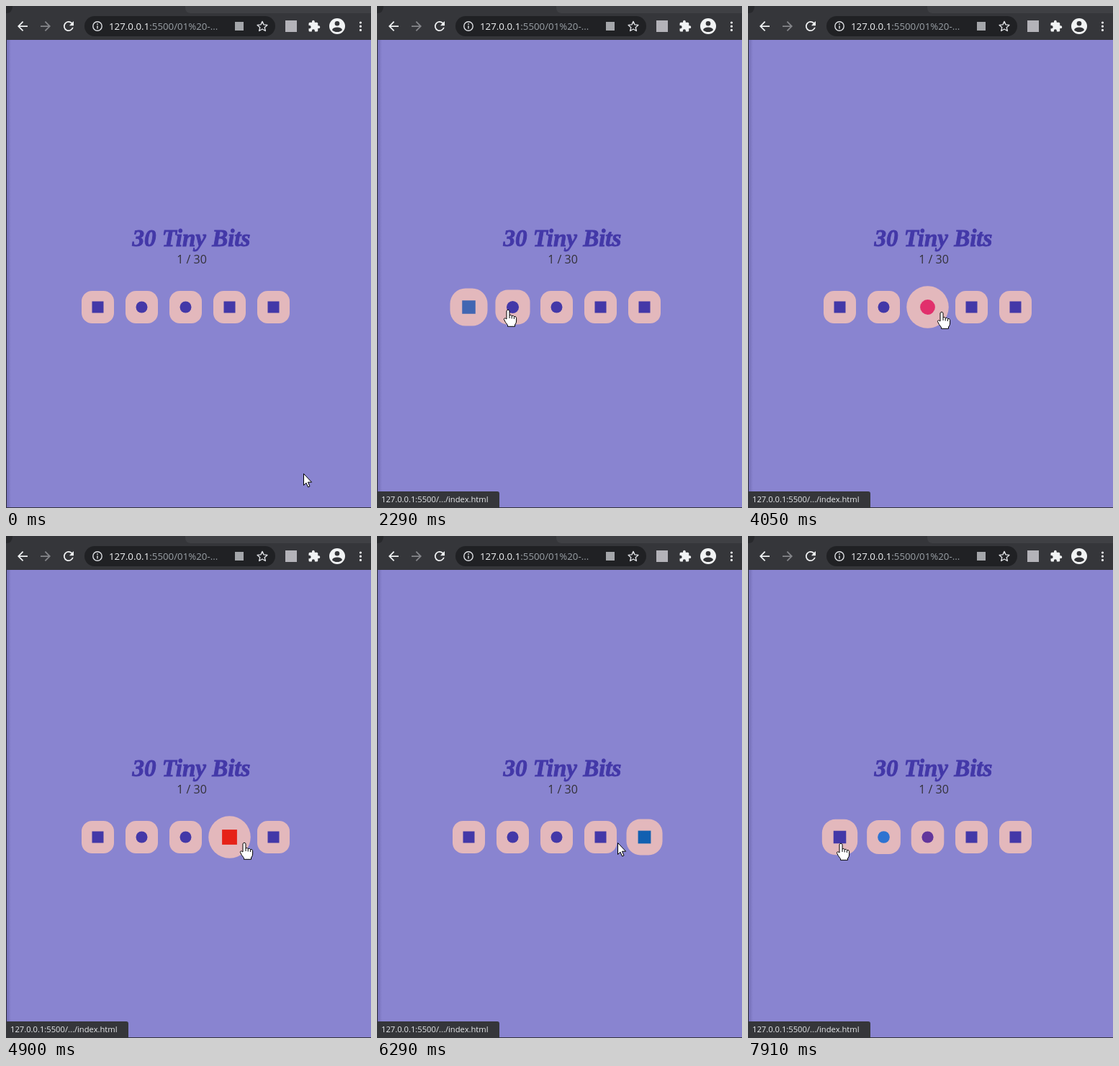
An HTML page that plays this animation: 507x696 px, repeating every 7990 ms.

```html
<!DOCTYPE html>
<html lang="en">
<head>
<meta charset="utf-8">
<title>Icon hover</title>
<style>
html, body { margin: 0; width: 100%; height: 100%; overflow: hidden; background: #8984d0; }
svg { display: block; }
text { font-family: "Open Sans", sans-serif; }
.title { font: italic bold 33px "Liberation Serif", serif; fill: #4338a8; stroke: #4338a8; stroke-width: .9; }
</style>
</head>
<body>
<svg width="507" height="696" viewBox="0 0 507 696">
  <defs>
    <linearGradient id="edge">
      <stop offset="0" stop-color="#736eb6"/>
      <stop offset="1" stop-color="#8984d0"/>
    </linearGradient>
    <path id="back" d="M20 11H7.8l5.6-5.6L12 4l-8 8 8 8 1.4-1.4L7.8 13H20z"/>
  </defs>
  <rect width="507" height="696" fill="#8984d0"/>
  <rect x="1" y="47" width="6" height="649" fill="url(#edge)"/>
  <rect y="47" width="1" height="649" fill="#2c2b36"/>
  <rect y="695" width="507" height="1" fill="#35343f"/>

  <!-- browser bar -->
  <rect width="507" height="47" fill="#35363a"/>
  <path d="M249 0H507V10H257Q249 10 249 2Z" fill="#3f4044"/>
  <path d="M0 0H9Q9 10 0 10Z" fill="#28292c"/>
  <rect x="109" y="14" width="265" height="28" rx="14" fill="#202124"/>
  <g fill="#f1f3f4">
    <use href="#back" transform="translate(12.5 17.5) scale(.875)"/>
    <use href="#back" transform="translate(65.5 17.5) scale(-.875 .875)" fill="#85868a"/>
    <path transform="translate(76.5 17.5) scale(.875)" d="M17.6 6.4A8 8 0 1 0 19.7 14h-2.1A6 6 0 1 1 16.2 7.8L13 11h7V4z"/>
    <path transform="translate(419 19) scale(.75)" d="M20.5 11H19V7q0-2-2-2H13V3.5a2.5 2.5 0 0 0-5 0V5H4Q2 5 2 7v3.8h1.5a2.7 2.7 0 0 1 0 5.4H2V20q0 2 2 2h3.8v-1.5a2.7 2.7 0 0 1 5.4 0V22H17q2 0 2-2v-4h1.5a2.5 2.5 0 0 0 0-5z"/>
    <circle cx="460" cy="28" r="11"/>
    <path d="M492.5 23v.01m0 5.2v.01m0 5.2v.01" stroke="#f1f3f4" stroke-width="3.2" stroke-linecap="round"/>
  </g>
  <g fill="#35363a">
    <circle cx="460" cy="24.2" r="3.3"/>
    <path d="M453 33.2Q454 29.6 460 29.6T467 33.2Q464.5 36 460 36T453 33.2Z"/>
  </g>
  <g fill="none" stroke="#dfe1e5" stroke-width="1.4">
    <circle cx="127" cy="28" r="6.2"/>
    <path d="M127 24.3v1.6M127 27.2v4.3"/>
    <path stroke-linejoin="round" d="M356 21.4l2 4.5 4.9.5-3.7 3.3 1.1 4.8-4.3-2.5-4.3 2.5 1.1-4.8-3.7-3.3 4.9-.5z"/>
  </g>
  <rect x="318" y="22" width="12" height="12" fill="#a4a6aa"/>
  <rect x="388" y="20" width="16" height="16" fill="#b4b3b9"/>
  <text x="143" y="33" font-size="13.3" fill="#9aa0a6"><tspan fill="#f1f3f4">127.0.0.1</tspan>:5500/01%20-...</text>

  <text class="title" x="257.5" y="333" text-anchor="middle">30 Tiny Bits</text>
  <text x="258" y="357" font-size="16" text-anchor="middle" fill="#333138">1 / 30</text>
  <g id="buttons"></g>

  <g id="status">
    <path d="M0 673H167Q170 673 170 676V696H0Z" fill="#35363a"/>
    <text x="6" y="688" font-size="11.2" fill="#e8eaed">127.0.0.1:5500/.../index.html</text>
  </g>
  <g id="cursor" fill="#fff" stroke="#000" stroke-linejoin="round">
    <path id="arrow" d="M.5 .5V16.5L4 13.2 6.6 19 9 18 6.5 12.2H11.6Z"/>
    <path id="hand" d="M-2 1.5Q0-1.5 2 1.5V8Q4 6.5 5.2 8.6 7.4 7.4 8.4 9.6 11 8.6 11.6 11.5V16Q11.5 19 9.5 21V23.3H-.5V21.5Q-4 17.5-5.6 13.5-5.5 10.5-2 13ZM2 8v4M5.2 9v3.5M8.4 10v3"/>
  </g>
</svg>
<script>
const LOOP = 7990, FADE = 500, HALF = 22.5, MID = 417.5, GROW = .3;
const TINT_LAG = 120, STATUS_LAG = 200;
const $ = id => document.getElementById(id);
const clamp = x => Math.min(1, Math.max(0, x));
const lerp = (a, b, k) => a + (b - a) * k;

function make(tag, attrs, parent) {
  const el = document.createElementNS("http://www.w3.org/2000/svg", tag);
  for (const k in attrs) el.setAttribute(k, attrs[k]);
  return parent.appendChild(el);
}

const base = [67, 56, 168];
const buttons = [
  { tone: [66, 103, 178], rx: 0 },
  { tone: [29, 161, 242], rx: 8 },
  { tone: [225, 48, 108], rx: 8 },
  { tone: [230, 33, 23], rx: 0 },
  { tone: [10, 102, 178], rx: 0 }
];
buttons.forEach((b, i) => {
  b.x = 127.5 + 61 * i;
  b.flips = []; // times when the pointer enters, leaves, enters ...
  b.g = make("g", {}, $("buttons"));
  b.box = make("rect", { x: -HALF, y: -HALF, width: 2 * HALF, height: 2 * HALF, fill: "#e3b8bc" }, b.g);
  b.icon = make("rect", { x: -8, y: -8, width: 16, height: 16, rx: b.rx }, b.g);
});

// CSS "ease": cubic-bezier(.25, .1, .25, 1)
function ease(x) {
  const bez = (a, b, u) => 3 * a * u * (1 - u) ** 2 + 3 * b * u * u * (1 - u) + u ** 3;
  let lo = 0, hi = 1;
  for (let i = 0; i < 16; i++) {
    const u = (lo + hi) / 2;
    if (bez(.25, .25, u) < x) lo = u; else hi = u;
  }
  return bez(.1, 1, lo);
}

// Hover amount; a reversed transition starts from where it had got to
function amount(flips, t) {
  let from = 0, to = 0, start = 0;
  const at = now => lerp(from, to, ease(clamp((now - start) / (FADE * Math.abs(to - from) || 1))));
  flips.forEach((time, i) => {
    if (time > t) return;
    from = at(time);
    to = 1 - i % 2;
    start = time;
  });
  return at(t);
}

// Pointer moves: start, end, x, y
const home = [413, 648];
const moves = [
  [40, 620, 66, 440], [620, 860, 134, 420], [2020, 2350, 192, 421],
  [3040, 3440, 254, 424], [3950, 4350, 315, 424], [4820, 5100, 372, 427],
  [6020, 6110, 341, 425], [6110, 6290, 334, 425], [6290, 6780, 282, 425],
  [6890, 7560, 218, 425], [7560, 7880, 129, 426]
];

function pointer(t) {
  let [px, py] = home;
  for (const [start, end, x, y] of moves) {
    const k = clamp((t - start) / (end - start));
    px = lerp(px, x, k);
    py = lerp(py, y, k);
  }
  return [px, py];
}

// Walk the loop once to find when the pointer crosses each button
for (let t = 0; t < LOOP; t += 5) {
  const [x, y] = pointer(t);
  for (const b of buttons) {
    const reach = HALF * (1 + GROW * amount(b.flips, t));
    const inside = Math.max(Math.abs(x - b.x), Math.abs(y - MID)) < reach;
    if (inside !== (b.flips.length % 2 === 1)) b.flips.push(t);
  }
}
const statusStart = buttons[0].flips[0] + STATUS_LAG;

function draw(now) {
  const t = now % LOOP;
  let over = false;
  for (const b of buttons) {
    const k = amount(b.flips, t), tint = amount(b.flips, t - TINT_LAG);
    over = over || b.flips.filter(time => time <= t).length % 2 === 1;
    b.g.setAttribute("transform", `translate(${b.x} ${MID}) scale(${1 + GROW * k})`);
    b.box.setAttribute("rx", lerp(14.5, HALF, k));
    b.icon.setAttribute("fill", `rgb(${base.map((c, i) => Math.round(lerp(c, b.tone[i], tint)))})`);
  }
  $("status").style.display = t >= statusStart ? "" : "none";
  $("hand").style.display = over ? "" : "none";
  $("arrow").style.display = over ? "none" : "";
  $("cursor").setAttribute("transform", `translate(${pointer(t).map(Math.round)})`);
  requestAnimationFrame(draw);
}
draw(0);
</script>
</body>
</html>
```
